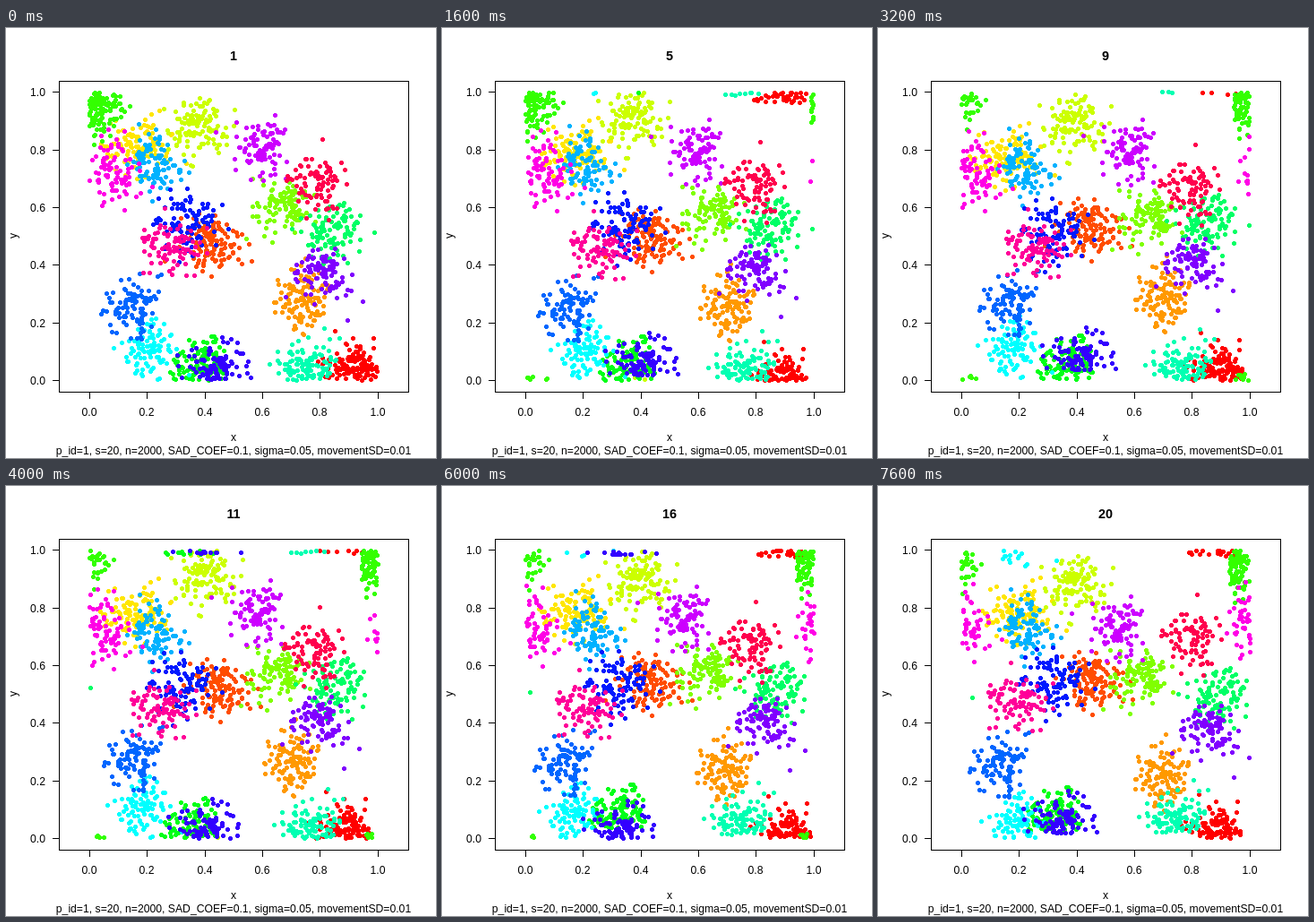
Recreate the animation shown at these times as an HTML page. Size 480 by 480 pixels, loop 8000 ms.

```html
<!DOCTYPE html>
<html lang="en">
<head>
<meta charset="utf-8">
<title>Species scatter</title>
<style>
  html, body { margin: 0; width: 100%; height: 100%; overflow: hidden; background: #fff; }
  svg { display: block; width: 480px; height: 480px; }
  text { font: 12.2px "Liberation Sans", Arial, sans-serif; fill: #000; text-anchor: middle; }
  #title { font-size: 14.4px; font-weight: bold; }
  .end { text-anchor: end; }
  #axes { fill: none; stroke: #000; shape-rendering: crispEdges; }
  #dots { shape-rendering: crispEdges; }
</style>
</head>
<body>
<svg viewBox="0 0 480 480">
  <g id="dots"></g>
  <path id="axes"/>
  <g id="labels">
    <text id="title" x="254" y="36">1</text>
    <text x="254" y="461">x</text>
    <text transform="translate(12 232) rotate(-90)">y</text>
    <text x="254" y="476">p_id=1, s=20, n=2000, SAD_COEF=0.1, sigma=0.05, movementSD=0.01</text>
  </g>
</svg>
<script>
const STEPS = 20, STEP_MS = 400, SIGMA = 0.05, MOVE_SD = 0.01;
const NS = "http://www.w3.org/2000/svg";

// Each species: start x, y and its total drift, in hundredths
const species = [
  [93, 3.5, -3, -2],
  [42, 48, 3, 7],
  [74.5, 28, -4, -6.5],
  [16, 81, 3, -3],
  [38, 87, 2, 0],
  [67, 60, -5, -4.5],
  [2.5, 96, -7, 0],
  [38, 4, -6, 2.5],
  [84.5, 52, 5, -2.5],
  [74.5, 4.5, -1, 2],
  [20, 10.5, -1.5, -5.5],
  [22, 75, 0, -2.5],
  [15.5, 25.5, -1.5, 0],
  [34, 55.5, -2, -0.5],
  [44, 4, -9, 1.5],
  [80.5, 37, 5, 0.5],
  [59.5, 81.5, -5.5, -8],
  [9.5, 72.5, -8, 2],
  [28.5, 47, -9, 1],
  [79, 68.5, 1, 1]
];

function seeded(seed) {
  return () => {
    seed = (seed + 0x6D2B79F5) | 0;
    let t = Math.imul(seed ^ (seed >>> 15), 1 | seed);
    t = (t + Math.imul(t ^ (t >>> 7), 61 | t)) ^ t;
    return ((t ^ (t >>> 14)) >>> 0) / 4294967296;
  };
}
const random = seeded(20);
const normal = () =>
  Math.sqrt(-2 * Math.log(1 - random())) * Math.cos(2 * Math.PI * random());
const wrap = v => v - Math.floor(v);
const px = v => Math.round(92.85 + 322 * v);
const py = v => Math.round(392.85 - 321.4 * v);

function insideNormal(mean) {
  let v;
  do v = mean + SIGMA * normal(); while (v < 0 || v > 1);
  return v;
}

// Random walk pinned so that it ends at the given drift
function walk(drift) {
  const raw = [0];
  while (raw.length < STEPS) raw.push(raw[raw.length - 1] + MOVE_SD * normal());
  const end = raw[STEPS - 1];
  return raw.map((v, s) => {
    const p = s / (STEPS - 1);
    return v - end * p + drift * Math.pow(p, 0.7);
  });
}

function makeGroup([x, y, dx, dy], i) {
  const count = Math.round(120 * Math.exp(-0.02 * i));
  const points = Array.from({ length: count }, () =>
    [insideNormal(x / 100), insideNormal(y / 100)]);
  const node = document.createElementNS(NS, "path");
  node.setAttribute("fill", `hsl(${i * 18}, 100%, 50%)`);
  document.getElementById("dots").append(node);
  return { points, node, moveX: walk(dx / 100), moveY: walk(dy / 100) };
}

// Five-pixel disc
const dot = (x, y) => `M${x - 1} ${y - 2}h3v1h1v3h-1v1h-3v-1h-1v-3h1z`;

function drawAxes() {
  let d = "M59.5 59.5H449.5V406.5H59.5Z";
  const labels = document.getElementById("labels");
  const label = (text, x, y, cls = "") => {
    const t = document.createElementNS(NS, "text");
    t.setAttribute("x", x);
    t.setAttribute("y", y);
    t.setAttribute("class", cls);
    t.textContent = text;
    labels.append(t);
  };
  for (let i = 0; i <= 5; i++) {
    const v = i / 5, x = px(v), y = py(v);
    d += `M${x + 0.5} 406.5v7M59.5 ${y + 0.5}h-8`;
    label(v.toFixed(1), x, 433);
    label(v.toFixed(1), 44, y + 5, "end");
  }
  document.getElementById("axes").setAttribute("d", d);
}

const groups = species.map(makeGroup);
const title = document.getElementById("title");
let shown = -1;

function draw(ms) {
  const step = Math.floor(ms / STEP_MS) % STEPS;
  if (step === shown) return;
  shown = step;
  title.textContent = step + 1;
  for (const { points, node, moveX, moveY } of groups) {
    node.setAttribute("d", points.map(([x, y]) =>
      dot(px(wrap(x + moveX[step])), py(wrap(y + moveY[step])))).join(""));
  }
}

function tick() {
  draw(performance.now());
  requestAnimationFrame(tick);
}

drawAxes();
tick();
</script>
</body>
</html>
```
